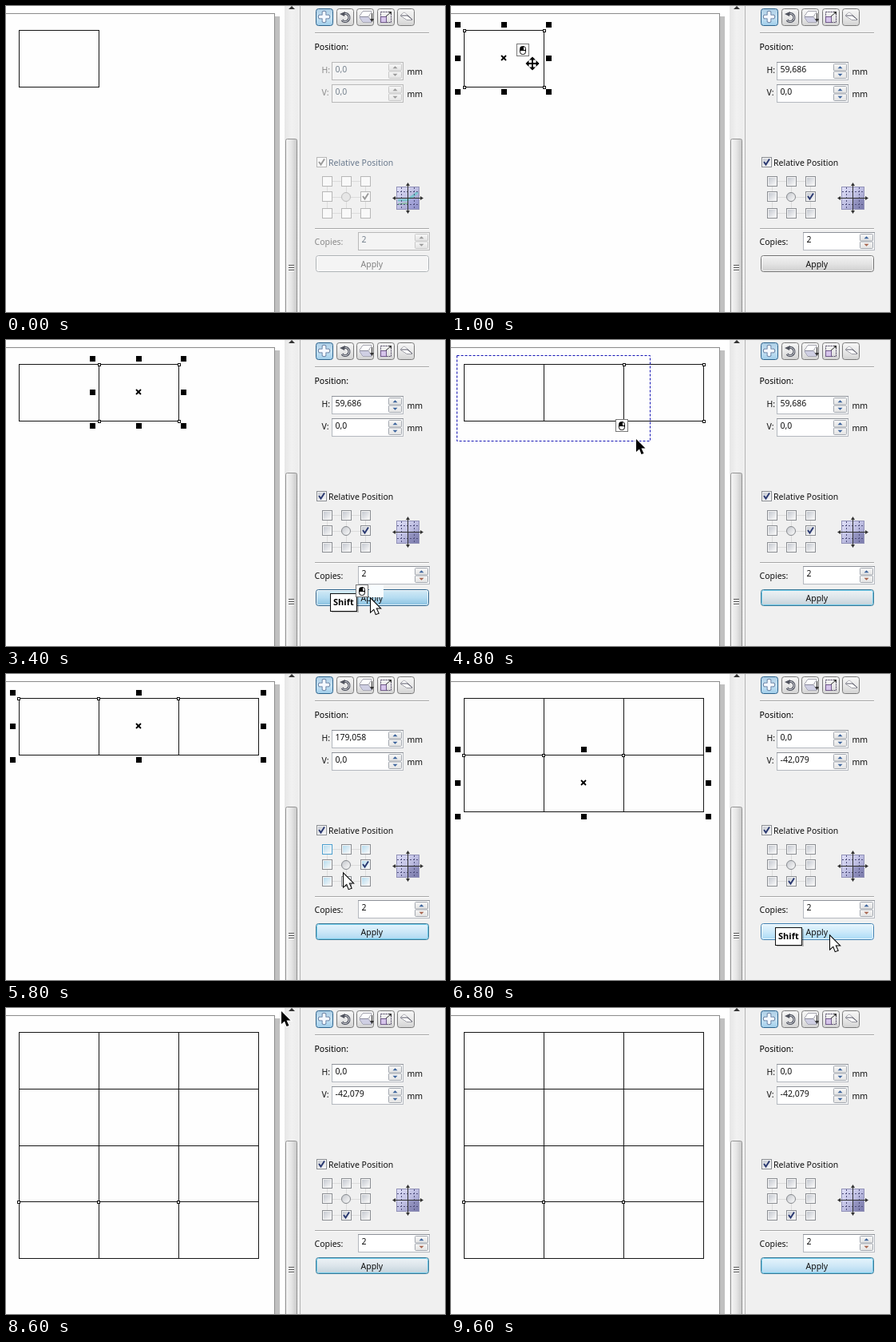
An HTML page with a canvas that plays this animation: 550x383 px, repeating every 9800 ms.

```html
<!DOCTYPE html>
<html lang="en">
<head>
<meta charset="utf-8">
<title>Copy and step</title>
<style>
html, body { margin: 0; width: 100%; height: 100%; overflow: hidden; background: #fff; }
canvas { display: block; width: 550px; height: 383px; }
</style>
</head>
<body>
<canvas id="stage" width="550" height="383"></canvas>
<script>
const ctx = document.getElementById('stage').getContext('2d');
const LOOP = 9800, STEP = 200;
const FONT = '10.5px "Noto Sans", "Open Sans", sans-serif';
const COLS = [16, 116, 216, 316];
const ROWS = [30, 101, 172, 242, 313];

// Pointer path: time, x, y
const PATH = [
  [200, 210, 372], [800, 102, 72], [1400, 102, 72], [2400, 457, 324],
  [3600, 457, 324], [4400, 7, 19], [4800, 232, 124], [5000, 322, 128],
  [5200, 325, 130], [5800, 423, 250], [6000, 426, 259], [6200, 426, 259],
  [6600, 475, 328], [7800, 475, 328], [8600, 345, 4]
];

const within = (t, a, b) => t >= a && t < b;

function rect(x, y, w, h, fill) {
  ctx.fillStyle = fill;
  ctx.fillRect(x, y, w, h);
}

function frame(x, y, w, h, fill, border) {
  rect(x, y, w, h, border);
  rect(x + 1, y + 1, w - 2, h - 2, fill);
}

function rounded(x, y, w, h, r, fill, border) {
  ctx.beginPath();
  ctx.roundRect(x + .5, y + .5, w - 1, h - 1, r);
  ctx.fillStyle = fill;
  ctx.fill();
  ctx.strokeStyle = border;
  ctx.lineWidth = 1;
  ctx.stroke();
}

function poly(points, fill, stroke, width = 1) {
  ctx.beginPath();
  points.forEach(([x, y]) => ctx.lineTo(x, y));
  ctx.closePath();
  if (stroke) {
    ctx.strokeStyle = stroke;
    ctx.lineWidth = width;
    ctx.stroke();
  }
  if (fill) {
    ctx.fillStyle = fill;
    ctx.fill();
  }
}

function line(points, color, width = 1) {
  ctx.beginPath();
  points.forEach(([x, y]) => ctx.lineTo(x, y));
  ctx.strokeStyle = color;
  ctx.lineWidth = width;
  ctx.stroke();
}

function text(str, x, y, color = '#111', font = FONT) {
  ctx.font = font;
  ctx.fillStyle = color;
  ctx.fillText(str, x, y);
}

function gradient(x0, y0, x1, y1, ...colors) {
  const g = ctx.createLinearGradient(x0, y0, x1, y1);
  colors.forEach((c, i) => g.addColorStop(i / (colors.length - 1), c));
  return g;
}

function mix(a, b, k) {
  return 'rgb(' + a.map((v, i) => Math.round(v + (b[i] - v) * k)).join() + ')';
}

function pointerAt(t) {
  if (t < PATH[0][0] || t > PATH[PATH.length - 1][0]) return null;
  const i = Math.max(1, PATH.findIndex(p => p[0] >= t));
  const [t0, x0, y0] = PATH[i - 1], [t1, x1, y1] = PATH[i];
  const k = (t - t0) / (t1 - t0);
  return [Math.round(x0 + (x1 - x0) * k), Math.round(y0 + (y1 - y0) * k)];
}

function stateAt(t) {
  const down = t >= 6200;
  return {
    t,
    on: t >= 1000,
    cols: t < 3000 ? 1 : t < 3600 ? 2 : 3,
    rows: t < 6800 ? 1 : t < 7200 ? 2 : t < 7800 ? 3 : 4,
    h: t < 1000 || down ? '0,0' : t < 5200 ? '59,686' : '179,058',
    v: down ? '-42,079' : '0,0',
    pick: down ? [1, 2] : [2, 1],
    handles: within(t, 1000, 4600) || within(t, 5200, 8600),
    marquee: within(t, 4600, 5200),
    shift: within(t, 2600, 3800) || within(t, 6600, 8000),
    click: [[1000, 1400], [2800, 3000], [3400, 3600], [4400, 5200], [6000, 6200],
      [6600, 6800], [7000, 7200], [7400, 7800]].some(([a, b]) => within(t, a, b)),
    hot: within(t, 2400, 3800) || within(t, 6600, 8200),
    pointer: pointerAt(t)
  };
}

/* Drawing page */

function drawPage(s) {
  rect(0, 0, 366, 383, '#fff');
  rect(337, 13, 6, 370, '#c0c0c0');
  frame(-1, 9, 338, 380, '#fefefe', '#8c8c8c');
  for (let r = 0; r < s.rows; r++) {
    for (let c = 0; c < s.cols; c++) {
      ctx.strokeStyle = '#161616';
      ctx.lineWidth = 1;
      ctx.strokeRect(COLS[c] + .5, ROWS[r] + .5, COLS[c + 1] - COLS[c], ROWS[r + 1] - ROWS[r]);
    }
  }
  if (s.on) drawSelection(s);
  if (s.marquee) drawMarquee(s);
}

function node(x, y) {
  frame(x - 2, y - 2, 4, 4, '#fff', '#111');
}

function drawSelection(s) {
  const whole = s.t >= 5200;
  const left = whole ? COLS[0] : COLS[s.cols - 1], right = COLS[s.cols];
  const top = ROWS[s.rows - 1], bottom = ROWS[s.rows];
  if (whole) {
    COLS.slice(0, 3).forEach(x => node(x, top + 1));
  } else {
    for (const x of [left, right]) for (const y of [top, bottom]) node(x + 1, y + 1);
  }
  if (!s.handles) return;
  const cx = Math.round((left + right) / 2), cy = Math.floor((top + bottom) / 2);
  const xs = [left - 8, cx, right + 6], ys = [top - 7, cy, bottom + 6];
  xs.forEach((x, i) => ys.forEach((y, j) => {
    if (i !== 1 || j !== 1) rect(x - 3, y - 3, 7, 7, '#000');
  }));
  line([[cx - 3, cy - 3], [cx + 3, cy + 3]], '#000', 1.8);
  line([[cx + 3, cy - 3], [cx - 3, cy + 3]], '#000', 1.8);
}

function drawMarquee(s) {
  const [x, y] = s.pointer;
  const right = Math.min(x + 18, 328);
  ctx.setLineDash([3, 2]);
  ctx.strokeStyle = '#1414b4';
  ctx.lineWidth = 1;
  ctx.strokeRect(7.5, 19.5, right - 8, y + 2 - 19);
  ctx.setLineDash([]);
}

function drawScrollbar() {
  rect(349, 0, 17, 383, gradient(349, 0, 366, 0, '#e6e6e6', '#f1f1f1', '#ededed'));
  poly([[354, 4], [358, 0], [362, 4]], '#333');
  rounded(350, 166, 15, 230, 2, gradient(350, 0, 365, 0, '#f6f6f6', '#e6e6e6', '#c6c6c6'), '#949494');
  for (let y = 324; y < 333; y += 3) {
    rect(354, y, 7, 1, '#555');
    rect(354, y + 1, 7, 1, '#fff');
  }
}

/* Docker panel */

function drawToolbar() {
  [388, 414, 439, 465, 490].forEach((x, i) => {
    const fill = i ? gradient(0, 3, 0, 25, '#f7f7f7', '#e9e9e9', '#d2d2d2')
      : gradient(0, 3, 0, 25, '#a9cbe3', '#c8e3f4', '#9fcdea');
    rounded(x, 3, 22, 22, 3, fill, i ? '#7a7a7a' : '#2c628b');
  });
  const cross = [];
  for (let q = 0; q < 4; q++) {
    for (const [x, y] of [[-2, -2], [-2, -6], [0, -7], [2, -6]]) {
      const a = q * Math.PI / 2, c = Math.cos(a), n = Math.sin(a);
      cross.push([398.5 + x * c - y * n, 13.5 + x * n + y * c]);
    }
  }
  poly(cross, '#f4f8ff', '#49648c', 1.5);

  const arc = (color, w) => {
    ctx.beginPath();
    ctx.arc(425, 14.5, 5, -2.2, 2.5);
    ctx.strokeStyle = color;
    ctx.lineWidth = w;
    ctx.stroke();
  };
  arc('#474b58', 3);
  arc('#e9e9ee', 1);
  poly([[418, 10], [425, 7], [424, 13]], '#50535e');

  poly([[443, 13], [447, 7], [458, 7], [454, 13]], '#fff', '#55556a');
  poly([[443, 14], [454, 14], [458, 20], [447, 20]], '#cfcfe3', '#777790');
  line([[458.5, 9], [458.5, 18]], '#333');
  poly([[456, 16], [461, 16], [458.5, 20]], '#333');

  ctx.setLineDash([2, 1]);
  ctx.strokeStyle = '#514765';
  ctx.lineWidth = 1;
  ctx.strokeRect(469.5, 7.5, 13, 13);
  ctx.setLineDash([]);
  frame(469, 13, 8, 8, '#d5c3ea', '#70598a');
  line([[476, 13], [482, 8]], '#333');
  poly([[479, 7], [483, 7], [483, 11]], '#333');

  poly([[494, 12], [499, 8], [509, 17], [502, 17]], '#fff', '#555564');
  line([[495, 12], [503, 12], [509, 17]], '#555564');
  rect(387, 33, 143, 1, '#a6a6a6');
  rect(387, 34, 143, 1, '#fff');
}

function spinner(x, y, h, on, warm) {
  const half = h / 2;
  for (let i = 0; i < 2; i++) {
    const top = y + i * half, my = top + half / 2;
    rounded(x, top, 17, half, 1, gradient(0, top, 0, top + half, '#f8f8f8', '#e2e2e2'), on ? '#a3a8b0' : '#c9c9c9');
    const d = i ? 1.5 : -1.5;
    const color = !on ? '#9a9a9a' : warm && i ? '#a7644e' : '#3c639c';
    poly([[x + 5.5, my - d], [x + 11.5, my - d], [x + 8.5, my + d]], color);
  }
}

function field(x, y, w, h, value, on, warm) {
  frame(x, y, w, h, on ? '#fff' : '#f4f4f4', on ? '#b4b8bf' : '#b9b9b9');
  if (on) rect(x, y, w, 1, '#8e9299');
  text(value, x + 4.5, y + 13, on ? '#111' : '#77838f');
  spinner(x + w - 19, y + 2, h - 4, on, warm);
}

function checkbox(x, y, checked, on, warmth, hover) {
  const border = hover ? '#4a9fd0' : on ? '#8a8d92' : '#b7b7b7';
  frame(x, y, 13, 13, on ? '#f6f6f6' : '#f9f9f9', border);
  if (on) {
    const from = warmth ? '#b5dcef' : '#c4c8d0';
    rect(x + 2, y + 2, 9, 9, gradient(x + 2, y + 2, x + 11, y + 11, from, '#f8f8f8'));
  }
  if (checked) {
    line([[x + 3, y + 6], [x + 5.5, y + 9.5], [x + 10, y + 2.5]], on ? '#28376f' : '#999', 1.9);
  }
}

function drawAnchors(s) {
  ctx.strokeStyle = '#dcdcdc';
  ctx.lineWidth = 1;
  ctx.strokeRect(402.5, 219.5, 48, 40);
  line([[402, 239.5], [450, 239.5]], '#dcdcdc');
  line([[426.5, 219], [426.5, 259]], '#dcdcdc');
  const warm = within(s.t, 5600, 6400);
  for (let r = 0; r < 3; r++) {
    for (let c = 0; c < 3; c++) {
      const x = 396 + c * 24, y = [213, 232, 253][r];
      if (r === 1 && c === 1) {
        ctx.beginPath();
        ctx.arc(426, 239, 5.5, 0, 7);
        ctx.fillStyle = s.on ? gradient(421, 234, 431, 244, '#c6c9ce', '#fafafa') : '#e6e6e6';
        ctx.fill();
        ctx.strokeStyle = s.on ? '#85888d' : '#bcbcbc';
        ctx.stroke();
      } else {
        checkbox(x, y, c === s.pick[0] && r === s.pick[1], s.on, warm, warm && !c && !r);
      }
    }
  }
}

function drawThumb(on) {
  frame(489, 226, 29, 29, gradient(489, 226, 518, 255, '#e2e2fa', '#bebee2', '#8585b5'), '#9292b8');
  rect(504, 241, 13, 13, on ? 'rgba(95,95,150,.35)' : 'rgba(150,150,225,.35)');
  if (!on) {
    line([[491, 243], [503, 243], [516, 233]], '#7cc4cf', 3);
    line([[491, 248], [503, 247]], '#88b9a4', 2);
  }
  ctx.setLineDash([2, 2]);
  for (const d of [6, 22]) {
    line([[490, 226.5 + d], [517, 226.5 + d]], '#50507c');
    line([[489.5 + d, 227], [489.5 + d, 254]], '#50507c');
  }
  ctx.setLineDash([]);
  line([[485, 240.5], [522, 240.5]], '#333');
  line([[503.5, 222], [503.5, 259]], '#333');
  const tip = '#333';
  poly([[484, 240.5], [488, 238], [488, 243]], tip);
  poly([[523, 240.5], [519, 238], [519, 243]], tip);
  poly([[503.5, 221], [501, 225], [506, 225]], tip);
  poly([[503.5, 260], [501, 256], [506, 256]], tip);
}

function drawApply(s) {
  let colors = ['#f4f4f4', '#f4f4f4'], border = '#adb2b5';
  if (s.hot) {
    const pressed = s.click || s.t === 3400;
    colors = pressed ? ['#d5ebf6', '#b5dcf1', '#86bfdf'] : ['#e9f6fd', '#cdeafa', '#a7d9f5'];
    border = pressed ? '#2c628b' : '#3c7fb1';
  } else if (s.on) {
    const glow = s.t < 3600 ? 0 : .3 + .35 * (1 - Math.cos((s.t - 4800) / 1000 * Math.PI));
    colors = [
      mix([243, 243, 243], [231, 245, 253], glow),
      mix([228, 228, 228], [205, 232, 248], glow),
      mix([205, 205, 205], [171, 215, 241], glow)
    ];
    border = s.t < 3600 ? '#707070' : '#3b7896';
  }
  rounded(388, 312, 142, 21, 3, gradient(0, 312, 0, 333, ...colors), border);
  ctx.beginPath();
  ctx.roundRect(389.5, 313.5, 139, 18, 2);
  ctx.strokeStyle = s.on && s.t >= 3600 && !s.hot ? '#72cbe9' : 'rgba(255,255,255,.75)';
  ctx.stroke();
  text('Apply', 444.5, 327, s.on ? '#111' : '#838383');
}

function drawPanel(s) {
  rect(366, 0, 184, 383, '#f0f0f0');
  rect(368, 0, 1, 383, '#b4b4b4');
  drawToolbar();
  const label = s.on ? '#111' : '#8b8b8b';
  text('Position:', 386.5, 55, '#000');
  text('H:', 395.5, 84, label);
  field(408, 70, 90, 23, s.h, s.on);
  text('mm', 502.5, 86);
  text('V:', 395.5, 112, label);
  field(408, 98, 90, 23, s.v, s.on);
  text('mm', 502.5, 114);
  checkbox(389, 189, true, s.on);
  text('Relative Position', 404, 200, s.on ? '#111' : '#69798d');
  drawAnchors(s);
  drawThumb(s.on);
  rect(387, 278, 143, 1, '#a6a6a6');
  rect(387, 279, 143, 1, '#fff');
  text('Copies:', 386.5, 299, label);
  field(441, 283, 90, 23, '2', s.on, true);
  drawApply(s);
}

/* Pointer and input hints */

function drawShift() {
  rect(408, 319, 34, 22, 'rgba(0,0,0,.25)');
  frame(406, 317, 34, 23, '#fff', '#111');
  text('Shift', 410, 332, '#000', 'bold 11px "Noto Sans", "Open Sans", sans-serif');
}

function drawMouse(x, y) {
  frame(x, y, 16, 16, '#fff', '#777');
  ctx.beginPath();
  ctx.roundRect(x + 4.5, y + 3.5, 7, 10, 3);
  ctx.strokeStyle = '#000';
  ctx.lineWidth = 1;
  ctx.stroke();
  rect(x + 5, y + 4, 3, 4, '#000');
  line([[x + 4, y + 8.5], [x + 12, y + 8.5]], '#000');
  line([[x + 8.5, y + 3], [x + 8.5, y + 8]], '#000');
}

function drawMove(x, y) {
  const heads = [[0, -1], [1, 0], [0, 1], [-1, 0]];
  for (const [color, grow] of [['#fff', 1], ['#000', 0]]) {
    rect(x - 7 - grow, y - 1 - grow, 15 + 2 * grow, 2 + 2 * grow, color);
    rect(x - 1 - grow, y - 7 - grow, 2 + 2 * grow, 15 + 2 * grow, color);
    for (const [a, b] of heads) {
      poly([
        [x + a * 8.5, y + b * 8.5],
        [x + a * 4.5 - b * 4, y + b * 4.5 + a * 4],
        [x + a * 4.5 + b * 4, y + b * 4.5 - a * 4]
      ], color, grow ? color : null, 2);
    }
  }
}

function drawArrow(x, y, dark) {
  const shape = [[0, 0], [0, 16], [4, 12.5], [6.5, 19], [9.5, 18], [6.5, 11.5], [11.5, 11.5]]
    .map(([dx, dy]) => [x + dx, y + dy]);
  poly(shape, dark ? '#000' : '#fff', dark ? '#fff' : '#000', 2);
}

function drawPointer(s) {
  if (s.shift) drawShift();
  if (!s.pointer) return;
  const [x, y] = s.pointer;
  const moving = within(s.t, 800, 1400);
  if (s.click) {
    if (s.t < 3600 && !moving) rect(455, 307, 18, 15, '#f8fcfe');
    const dx = moving ? 20 : s.marquee ? 26 : 19, dy = moving || s.marquee ? 25 : 18;
    drawMouse(x - dx, y - dy);
  }
  if (moving) drawMove(x, y);
  else drawArrow(x, y, x < 346);
}

function draw(now) {
  const t = Math.floor((now % LOOP) / STEP) * STEP;
  const s = stateAt(t);
  drawPage(s);
  drawScrollbar();
  drawPanel(s);
  drawPointer(s);
}

const start = performance.now();
function tick() {
  draw(performance.now() - start);
  requestAnimationFrame(tick);
}
tick();
</script>
</body>
</html>
```
